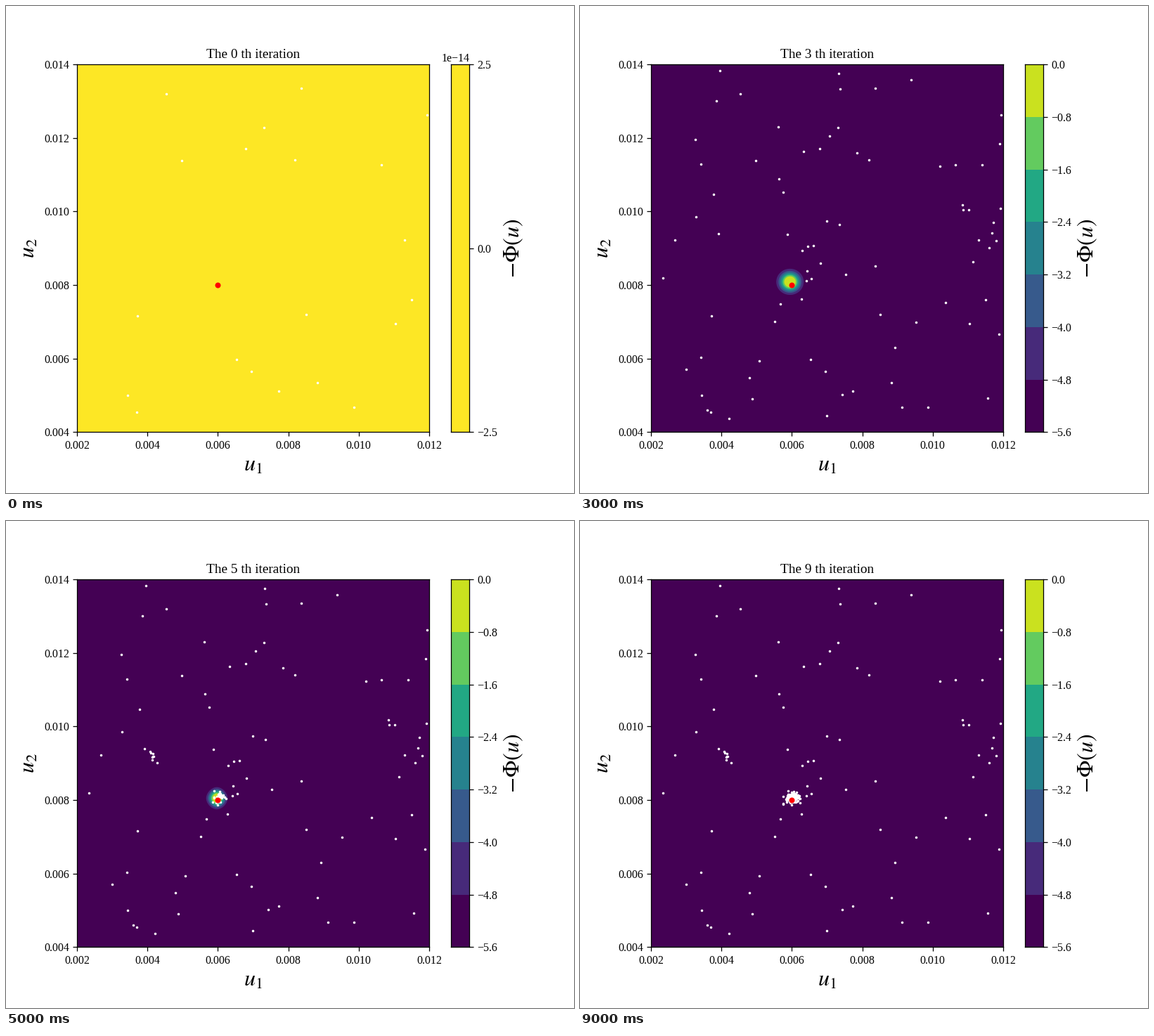
A matplotlib script that plays this animation: 808 by 693 pixels, repeating every 10000 ms.

```python
import numpy as np
import matplotlib.pyplot as plt
from matplotlib.animation import FuncAnimation

plt.rcParams.update({"font.family": "Liberation Serif", "mathtext.fontset": "stix",
                     "font.size": 10})

W, H, DPI = 808, 693, 115.5
LEFT, RIGHT, TOP, BOTTOM = 101, 601.96, 83.16, 606.375
viridis = plt.get_cmap("viridis")
BANDS = [viridis((0.8 * k - 0.2) / 5) for k in range(7)]
YELLOW = viridis(1.0)

# Round wells (x, y, radius) whose smooth union is the darkest ground
WELLS = np.array([(199, 92, 52), (194, 135, 62), (164, 190, 59), (172, 225, 48),
                  (190, 268, 44), (165, 300, 34), (135, 333, 42), (118, 387, 46),
                  (368, 96, 46), (370, 118, 43), (394, 209, 45), (318, 207, 47),
                  (283, 246, 18), (355, 185, 45), (151, 517, 28), (172, 500, 22)])
# Weak wells lower the saddles without turning dark
SADDLES = np.array([(248, 262, -4), (249, 277, -4), (246, 212, -6), (270, 162, -8),
                    (203, 502, -3), (235, 520, -4)])
# Oval wells (x, y, half width, half height)
ISLANDS = np.array([(478, 450, 33, 43), (458, 571, 33, 44), (580, 558, 40, 49)])
SUMMIT = (322, 391)

START = [(227.5, 125.5), (419.5, 117), (366.5, 173.5), (340.5, 203), (250, 220.5),
         (410.5, 219.5), (533.5, 226), (598.5, 155), (566.5, 333), (577, 418),
         (553.5, 452.5), (426.5, 439.5), (187, 441), (328, 503.5), (349, 520.5),
         (388, 548), (442.5, 536.5), (494.5, 571.5), (173, 554.5), (186, 578)]

rng = np.random.default_rng(4)


def spread(n, x0, x1, y0, y1):
    return rng.uniform((x0, y0), (x1, y1), (n, 2))


def cluster(n, cx, cy, sx, sy):
    """Normal scatter, cut off at two deviations."""
    return (cx, cy) + np.clip(rng.normal(size=(n, 2)), -2, 2) * (sx, sy)


BATCHES = [
    START,
    np.vstack([WELLS[:, :2], ISLANDS[:, :2], [SUMMIT]]),
    np.vstack([spread(9, 460, 600, 170, 490), cluster(7, 332, 370, 25, 32),
               spread(4, 105, 390, 515, 580)]),
    np.vstack([spread(13, LEFT, RIGHT, TOP, BOTTOM), cluster(7, 330, 375, 45, 40)]),
    np.vstack([cluster(8, 212, 336, 4, 4), cluster(12, 303, 390, 5, 3)]),
]
BATCHES += [cluster(20, 301, 394, s, 0.85 * s) for s in (6, 6, 3.5, 3.5, 6)]


def soft_min(layers, s):
    return -s * np.log(sum(np.exp(-d / s) for d in layers))


def oval_radius(x, y, cx, cy, rx, ry):
    return np.hypot((x - cx) / rx, (y - cy) / ry)


def terrain(x, y):
    """Height in colour steps: 0 is the rim of the dark ground, 5 the yellow rim."""
    rim = soft_min([np.hypot(x - cx, y - cy) - r
                    for cx, cy, r in np.vstack([WELLS, SADDLES])], 6)
    land = np.interp(rim, (-60, 0, 5, 11, 18, 42, 60), (-1, 0, 1, 2, 3, 4, 4.5))
    isles = soft_min([(oval_radius(x, y, *o) - 1) * (o[2] + o[3]) / 7.2
                      for o in ISLANDS], 1.5)
    height = np.minimum(land, isles)

    arc = np.abs(oval_radius(x, y, 458, 571, 61, 83) - 1) * 61 / 7.5
    arc = np.hypot(arc, np.maximum(0, x - 418) / 7)
    for r in (oval_radius(x, y, *SUMMIT, 55.5, 64.5), oval_radius(x, y, 512, 607, 10, 9), arc):
        height = np.maximum(height, 5 + 3 * (1 - r))
    return height


fig = plt.figure(figsize=((W + 0.01) / DPI, (H + 0.01) / DPI), dpi=DPI, facecolor="white")
ax = fig.add_axes([0.125, 0.125, 0.62, 0.755])
grid = np.meshgrid(np.linspace(LEFT, RIGHT, 300), np.linspace(TOP, BOTTOM, 300))
landscape = ax.contourf(*grid, terrain(*grid), levels=[-99, 0, 1, 2, 3, 4, 5, 99],
                        colors=BANDS)
ax.set(xlim=(LEFT, RIGHT), ylim=(BOTTOM, TOP))
ax.set_xticks(np.linspace(LEFT, RIGHT, 6), [f"{v / 1000:.3f}" for v in range(2, 13, 2)])
ax.set_yticks(np.linspace(BOTTOM, TOP, 6), [f"{v / 1000:.3f}" for v in range(4, 15, 2)])
ax.set_xlabel("$u_1$", fontsize=20)
ax.set_ylabel("$u_2$", fontsize=20)
title = ax.set_title("", fontsize=12)
dots, = ax.plot([], [], "o", color="white", ms=3.5 * 72 / DPI, mew=0, zorder=2.1)
ax.plot(LEFT + 0.4 * (RIGHT - LEFT), BOTTOM - 0.4 * (BOTTOM - TOP), "o", color="red",
        ms=8 * 72 / DPI, mew=0, zorder=2.2)

cax = fig.add_axes([0.78375, 0.125, 26.16 / W, 0.755])
cax.set(xlim=(0, 1), ylim=(0, 1), xticks=[])
cax.yaxis.tick_right()
cax.yaxis.set_label_position("right")
cax.set_ylabel(r"$-\Phi(u)$", fontsize=20)
scale = fig.text(659.5 / W, 1 - 78.5 / H, "1e\u221214", ha="right", va="baseline")


def peak(cx, cy, rx, ry, power=1.0):
    """Nested rounded diamonds; a higher power gives sharper corners."""
    a = np.linspace(0, 2 * np.pi, 80)
    c, s = np.cos(a), np.sin(a)
    x, y = np.sign(c) * abs(c)**power, np.sign(s) * abs(s)**power
    for color, f in zip(BANDS[1:], (1, 0.84, 0.72, 0.61, 0.52, 0.42)):
        ax.fill(cx + rx * f * x, cy + ry * f * y, color=color, lw=0)


def paint_field(i):
    ax.set_facecolor(YELLOW if i == 0 else BANDS[0])
    landscape.set_visible(i in (1, 2))
    if i in (3, 4):
        peak(298.7, 392.5, 19.5, 18.6, 1 + 0.15 * (i - 3))
    elif 5 <= i <= 8:
        peak(300, 394.5, 15.3, 15.8, 1.1)


def paint_bar(i):
    colors = BANDS if i else [YELLOW]
    n = len(colors)
    for k, color in enumerate(colors):
        cax.axhspan(k / n, (k + 1) / n, color=color, lw=0)
    values = np.linspace(-5.6, 0, 8) if i else (-2.5, 0.0, 2.5)
    cax.set_yticks(np.linspace(0, 1, len(values)),
                   [f"{v:.1f}".replace("-", "\u2212") for v in values])
    scale.set_visible(i == 0)


def draw(i):
    for patch in list(ax.patches) + list(cax.patches):
        patch.remove()
    paint_field(i)
    paint_bar(i)
    dots.set_data(*np.vstack(BATCHES[:i + 1]).T)
    title.set_text(f"The {i} th iteration")
    return []


anim = FuncAnimation(fig, draw, frames=10, interval=1000, repeat=True, repeat_delay=0)
plt.show()
```
